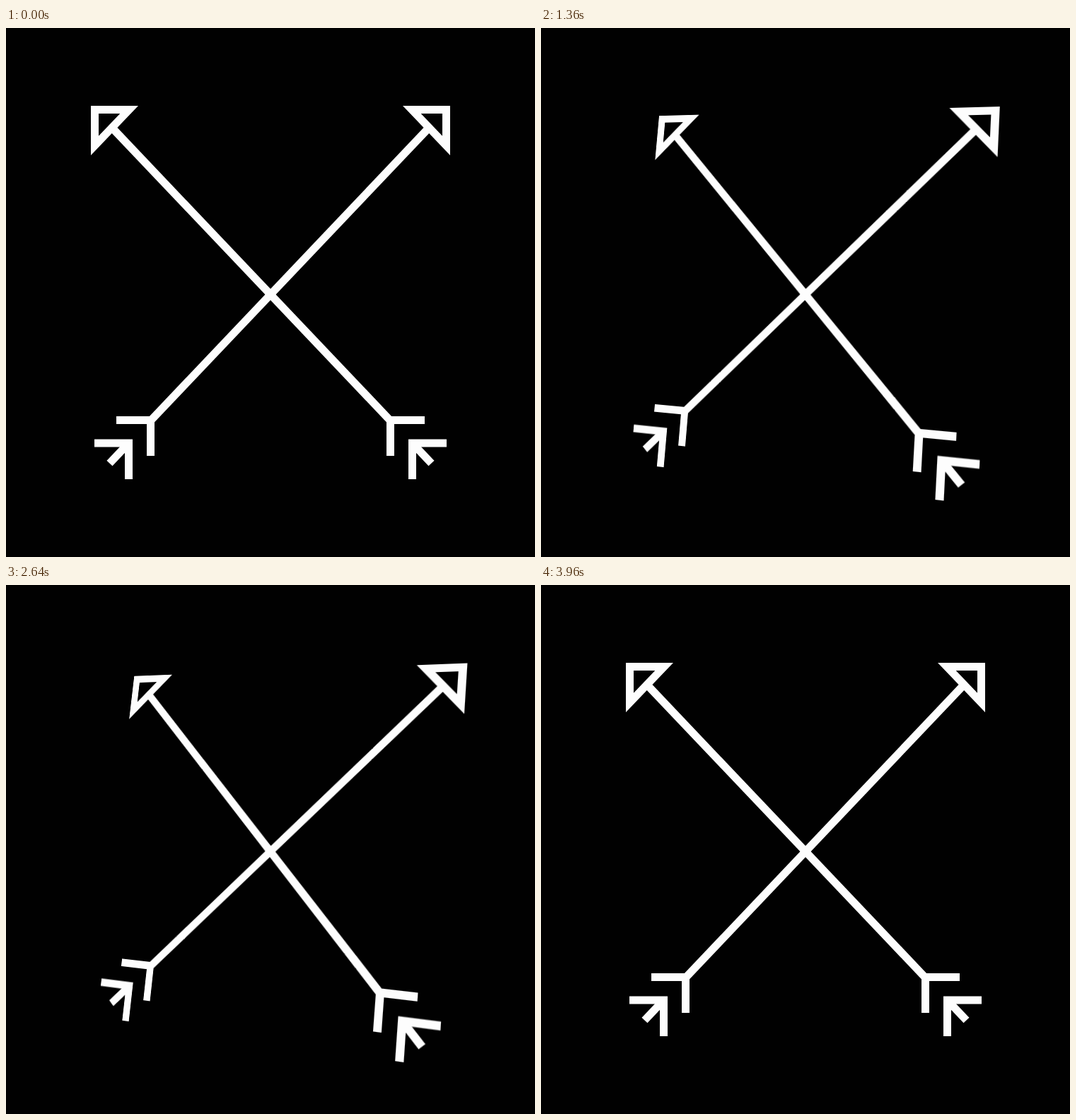
An HTML page for the animation above (4 s loop, 748 by 748 pixels).

```html
<!DOCTYPE html>
<html lang="en">
<head>
<meta charset="utf-8">
<title>Crossed arrows</title>
<style>
  html, body {
    margin: 0;
    width: 100%;
    height: 100%;
    overflow: hidden;
    background: #010101;
  }
  .stage {
    width: 748px;
    height: 748px;
    overflow: hidden;
    perspective: 1000px;
  }
  svg {
    display: block;
    fill: none;
    stroke: #fdfdfd;
    stroke-width: 11px;
    stroke-miterlimit: 10;
    overflow: visible;
    animation: tilt 4s infinite;
  }
  /* Eases away, turns back sharply, then settles */
  @keyframes tilt {
    0% {
      transform: rotate3d(.343, -.906, .191, 0deg);
      animation-timing-function: cubic-bezier(.333, 0, .667, .667);
    }
    50.5% {
      transform: rotate3d(.343, -.906, .191, 27.9deg);
      animation-timing-function: cubic-bezier(.333, 0, .667, 1);
    }
    99%, 100% {
      transform: rotate3d(.343, -.906, .191, 0deg);
    }
  }
</style>
</head>
<body>
<div class="stage">
  <svg width="748" height="748" viewBox="0 0 748 748">
    <defs>
      <g id="arrow">
        <path d="M125.5 115.5H174.1L125.5 166.3Z"/>
        <path d="M149.8 140.9L543.5 555.2"/>
        <path d="M592 554.5H543.5V605"/>
        <path d="M623 587H574.5V638"/>
        <path d="M574.5 587L601.5 615.5"/>
      </g>
    </defs>
    <use href="#arrow"/>
    <use href="#arrow" transform="matrix(-1 0 0 1 748 0)"/>
  </svg>
</div>
</body>
</html>
```
